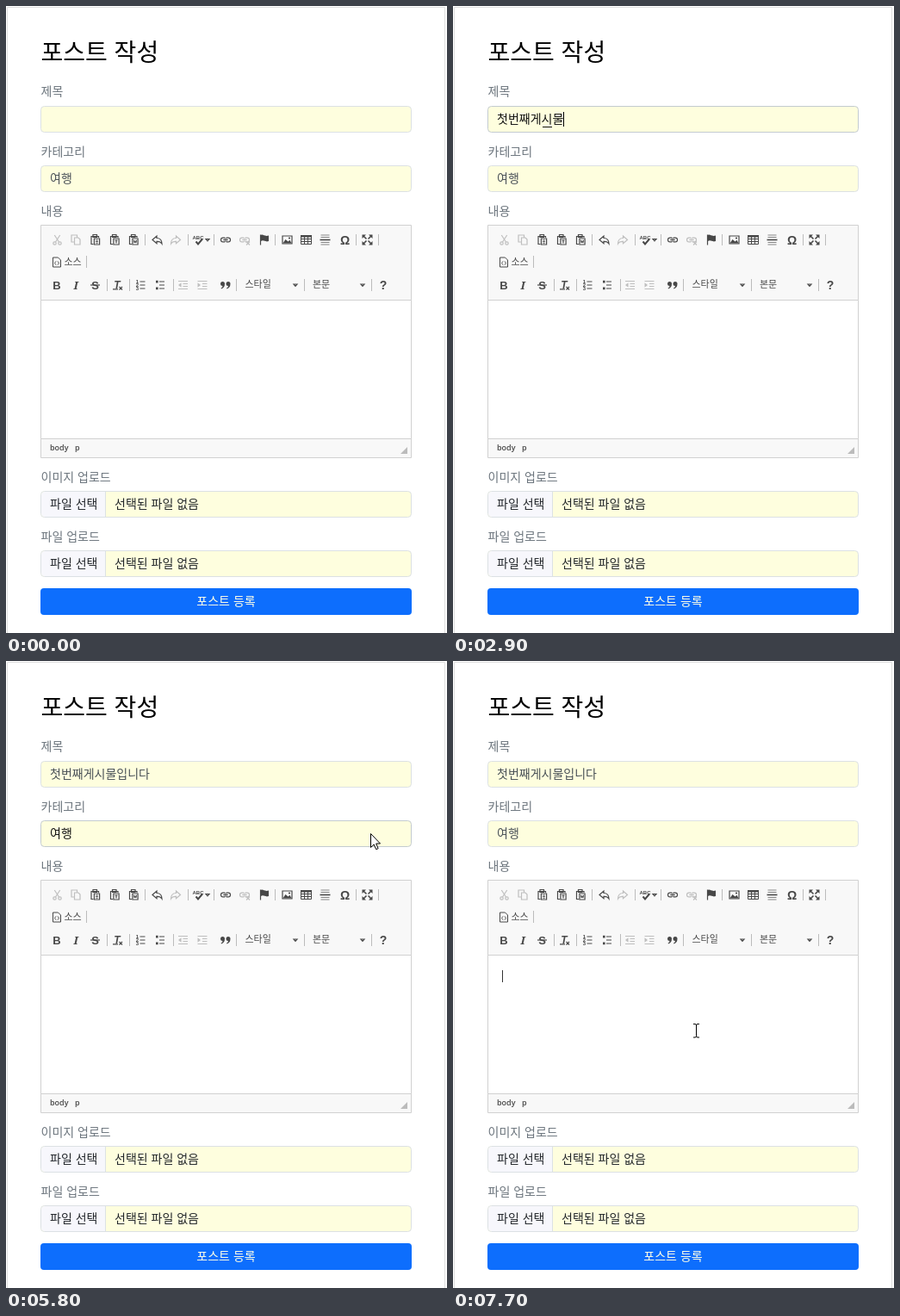
These frames come from a looping animation (512 by 728 pixels, 8000 ms). An HTML page:

```html
<!DOCTYPE html>
<html lang="ko">
<head>
<meta charset="utf-8">
<title>포스트 작성</title>
<style>
html, body { margin: 0; width: 100%; height: 100%; overflow: hidden; background: #fff; }
svg { display: block; }
text { font: 350 14px "Noto Sans CJK KR", "Noto Sans CJK", sans-serif; fill: #212529; white-space: pre; }
.title { font-size: 28px; fill: #000; }
.label text { fill: #6c757d; }
.box { fill: #fefede; stroke: #dce1e4; }
.value { fill: #495057; }
.light { fill: #ffffe6; }
.small text { font-size: 11px; fill: #484848; }
.path text { font: 600 9px "Open Sans", sans-serif; fill: #484848; }

.ico { fill: none; stroke: #484848; stroke-width: 1.2; }
.ico .f, .ico text { fill: #484848; stroke: none; }
.ico text { font: 700 14px "Liberation Sans", sans-serif; text-anchor: middle; }
.ico .tiny { font-size: 6px; }
.ico .serif { font: italic 700 13px "Noto Serif", serif; }
.off { opacity: .32; }

.anim, .anim * { animation: 8s step-end infinite; }
.title-box { animation-name: title-border; }
.title-value { animation-name: title-ink; }
.cat-box { animation-name: cat-border; }
.cat-value { animation-name: cat-ink; }
.menu { animation-name: menu; }
.arrow { animation-name: arrow; }
.beam { animation-name: beam; }
.body-caret { animation-name: body-caret; }
@keyframes title-border { 0%, 53.75% { stroke: #dce1e4; } 6.25% { stroke: #c3cbd0; } }
@keyframes title-ink { 0%, 53.75% { fill: #495057; } 6.25% { fill: #111; } }
@keyframes cat-border { 0%, 95% { stroke: #dce1e4; } 72.5% { stroke: #c3cbd0; } }
@keyframes cat-ink { 0%, 95% { fill: #495057; } 72.5% { fill: #111; } }
@keyframes menu { 0%, 87.5% { visibility: hidden; } 73.75% { visibility: visible; } }
@keyframes body-caret { 0% { visibility: hidden; } 95% { visibility: visible; } }
@keyframes arrow {
  0%, 92.5% { transform: translate(600px, 0); }
  70% { transform: translate(492px, 215px); }
  71.25% { transform: translate(446px, 205px); }
  72.5% { transform: translate(423px, 200px); }
  77.5% { transform: translate(411px, 208px); }
  78.75% { transform: translate(394px, 221px); }
  80% { transform: translate(379px, 231px); }
  81.25% { transform: translate(373px, 235px); }
  91.25% { transform: translate(364px, 262px); }
}
@keyframes beam {
  0% { transform: translate(600px, 0); }
  92.5% { transform: translate(330px, 352px); }
  93.75% { transform: translate(297px, 408px); }
  95% { transform: translate(284px, 427px); }
  96.25% { transform: translate(282px, 429px); }
}
</style>
</head>
<body>
<svg width="512" height="728" viewBox="0 0 512 728">
  <defs>
    <filter id="shadow" x="-5%" y="-50%" width="110%" height="200%">
      <feDropShadow dx="0" dy="2" stdDeviation="2.2" flood-color="#000" flood-opacity=".42"/>
    </filter>
    <g id="clip">
      <path d="M-2.5 5H-5V-4H3.5V-2.5"/>
      <path class="f" d="M-3-6H1.5V-3H-3Z"/>
      <path d="M-1.6-1.5H4.6V5.5H-1.6Z"/>
    </g>
    <path id="undo" class="f" d="M-5.5 0L-.5-4.5V-2C3.5-2 5.5 1 5.5 4.5C4 2 2 1.7-.5 1.8V4.3Z"/>
    <path id="link" d="M-.8-2.3H-3.2a2.3 2.3 0 0 0 0 4.6H-.8M.8-2.3H3.2a2.3 2.3 0 0 1 0 4.6H.8M-2.8 0H2.8M-.8-2.3V-1M.8-2.3V-1M-.8 2.3V1M.8 2.3V1"/>
    <path id="lines" d="M-1-4H5M-1 0H5M-1 4H5"/>
    <path id="dent" d="M-5.5-4.5H5.5M0-1.5H5.5M0 1.5H5.5M-5.5 4.5H5.5"/>
    <path id="drop" class="f" d="M-2-1H2L0 1.3Z"/>
    <g id="file">
      <rect class="box" x="40.5" y=".5" width="430" height="30" rx="4"/>
      <path d="M115 1H45a4 4 0 0 0-4 4V26a4 4 0 0 0 4 4H115Z" fill="#f7f7fc"/>
      <path d="M115.5 1V30" stroke="#dce1e4"/>
      <text x="51" y="20">파일 선택</text>
      <text x="126" y="20">선택된 파일 없음</text>
    </g>
  </defs>

  <path d="M1.5 730V1.5H509.5V730" fill="none" stroke="#dedede"/>
  <text class="title" x="40.5" y="64">포스트 작성</text>
  <g class="label">
    <text x="40.5" y="104">제목</text>
    <text x="40.5" y="174">카테고리</text>
    <text x="40.5" y="243">내용</text>
    <text x="40.5" y="552">이미지 업로드</text>
    <text x="40.5" y="621">파일 업로드</text>
  </g>

  <g class="anim">
    <rect class="box title-box" x="40.5" y="116.5" width="430" height="30" rx="4"/>
    <text class="value title-value" id="typed" x="51" y="136"></text>
    <rect class="box cat-box" x="40.5" y="185.5" width="430" height="30" rx="4"/>
    <text class="value cat-value" x="51" y="205">여행</text>
  </g>
  <path id="underline" d="M1 140.5H12" stroke="#111"/>
  <path id="caret" d="M.5 123V140" stroke="#000"/>

  <!-- editor -->
  <path d="M40.5 254.5H470.5V524.5H40.5Z" fill="#f8f8f8" stroke="#d1d1d1"/>
  <path d="M40.5 341.5H470.5V502.5H40.5Z" fill="#fff" stroke="#d1d1d1"/>
  <path d="M466 512V520H458Z" fill="#bbb"/>
  <g class="path"><text x="51" y="516">body</text><text x="80" y="516">p</text></g>
  <path fill="none" stroke="#bcbcbc" d="M161.5 265v13M211.5 265v13M241.5 265v13M312.5 265v13M406.5 265v13M432.5 265v13
    M93.5 290v14M117.5 317v14M143.5 317v14M194.5 317v14M267.5 317v14M346.5 317v14M424.5 317v14"/>
  <g class="small">
    <text x="67.5" y="301">소스</text>
    <text x="277.5" y="327">스타일</text>
    <text x="356" y="327">본문</text>
  </g>

  <g class="ico" transform="translate(0 271.5)">
    <g class="off" transform="translate(59.5)">
      <path d="M-3.2-5.5L2 2.5M3.2-5.5L-2 2.5"/><circle cx="-3" cy="4" r="1.7"/><circle cx="3" cy="4" r="1.7"/>
    </g>
    <g class="off" transform="translate(81)"><path d="M-2 2.5H-5V-5.5H1.5V-2.5M-1.5-2.5H3L5-.5V5.5H-1.5Z"/></g>
    <g transform="translate(104)"><use href="#clip"/><path d="M0 .5H3M0 2H3M0 3.7H3" stroke-width=".8"/></g>
    <g transform="translate(126.5)"><use href="#clip"/><path d="M0 .5H3M1.5 .5V4"/></g>
    <g transform="translate(148.5)"><use href="#clip"/><path d="M-.2 .3L.6 3.5 1.5 1 2.4 3.5 3.2 .3" stroke-width=".9"/></g>
    <use href="#undo" x="175.5"/>
    <use class="off" href="#undo" transform="translate(197) scale(-1 1)"/>
    <g transform="translate(223)"><text class="tiny" y="-1">ABC</text><path d="M-2.5 2L0 5L5-1" stroke-width="2"/></g>
    <use href="#drop" x="234"/>
    <use href="#link" x="255"/>
    <g class="off" transform="translate(277)"><use href="#link"/><path d="M2 2L6 6M6 2L2 6"/></g>
    <g transform="translate(300)">
      <path d="M-4.5-6V6"/><path class="f" d="M-4-5.5C-1.5-7 0-3.5 5-5V1.5C1 3-1-.5-4 1.5Z"/>
    </g>
    <g transform="translate(326.5)">
      <path d="M-5.5-4.5H5.5V4.5H-5.5Z"/><path class="f" d="M-5 4L-2-.5 1 2 3 .3 5 4Z"/><circle class="f" cx="2.5" cy="-2" r="1.1"/>
    </g>
    <g transform="translate(348.5)">
      <path d="M-6-5H6V5H-6ZM-6-1H6M-6 2H6M-2-4V5M2-4V5" stroke-width="1"/><path class="f" d="M-6.5-5.5H6.5V-3H-6.5Z"/>
    </g>
    <g transform="translate(370.5)">
      <path d="M-5-5.5H5M-5-3H5M-5 3H5M-5 5.5H5" stroke-width="1" opacity=".65"/><path d="M-6 0H6" stroke-width="1.6"/>
    </g>
    <text x="393.5" y="5">Ω</text>
    <g transform="translate(419.5)">
      <path d="M-4.5-4.5L-1-1M4.5-4.5L1-1M-4.5 4.5L-1 1M4.5 4.5L1 1" stroke-width="1.6"/>
      <path class="f" d="M-6-6H-1.5L-6-1.5ZM6-6H1.5L6-1.5ZM-6 6H-1.5L-6 1.5ZM6 6H1.5L6 1.5Z"/>
    </g>
  </g>
  <g class="ico" transform="translate(59 297.5)">
    <path d="M-4.5-5.5H1.5L4.5-2.5V5.5H-4.5ZM-1-1L-2.5 1 -1 3M1-1L2.5 1 1 3" stroke-width="1"/>
  </g>
  <g class="ico" transform="translate(0 324)">
    <text x="59" y="4.5" style="font-size:13px">B</text>
    <text class="serif" x="81" y="4.5">I</text>
    <text x="103.5" y="4.5" style="font-size:13px">S</text><path d="M98 0H109"/>
    <text x="129" y="4" style="font-size:12px;font-style:italic">T</text>
    <path d="M124 4.8H130M131.5 2L135 5.5M135 2L131.5 5.5"/>
    <g transform="translate(156.5)">
      <use href="#lines"/><text class="tiny" x="-4" y="-2">1</text><text class="tiny" x="-4" y="2.2">2</text><text class="tiny" x="-4" y="6.4">3</text>
    </g>
    <g transform="translate(179)">
      <use href="#lines"/><path class="f" d="M-5-5.2H-2.4V-2.6H-5ZM-5 2.6H-2.4V5.2H-5Z"/>
    </g>
    <g class="off" transform="translate(205.5)"><use href="#dent"/><path class="f" d="M-5.5 0L-2-2.7V2.7Z"/></g>
    <g class="off" transform="translate(228)"><use href="#dent"/><path class="f" d="M-2 0L-5.5-2.7V2.7Z"/></g>
    <path class="f" d="M249-1.5a2.5 2.5 0 1 1 5 0Q254 3 250 4.5L249.6 3.5Q251.5 2.5 251.5 1A2.5 2.5 0 0 1 249-1.5ZM255.5-1.5a2.5 2.5 0 1 1 5 0Q260.500 3 256.500 4.500L256.100 3.500Q258 2.500 258 1A2.500 2.500 0 0 1 255.500-1.500Z"/>
    <use href="#drop" x="336"/><use href="#drop" x="414"/>
    <text x="438" y="5">?</text>
  </g>

  <use href="#file" y="563"/>
  <use href="#file" y="632"/>
  <rect x="40" y="676" width="431" height="31" rx="4" fill="#0d6efd"/>
  <text class="light" x="255.500" y="696" text-anchor="middle">포스트 등록</text>

  <g class="anim">
    <path class="body-caret" d="M57.500 359V373" stroke="#333"/>
    <g class="menu">
      <path d="M40 220H471V259H40Z" fill="#fefede" filter="url(#shadow)"/>
      <path d="M41 221H470V240H41Z" fill="#767676"/>
      <path d="M40.500 220.500H470.500V259.500H40.500Z" fill="none" stroke="#a9abab" stroke-opacity=".6"/>
      <text class="light" x="51" y="235">여행</text>
      <text x="51" y="254" style="fill:#111">프로그래밍</text>
    </g>
    <path class="arrow" d="M.5 .5V16.500L4.200 13L6.700 18.700L9.100 17.700L6.700 12H11.500Z" fill="#fff" stroke="#000"/>
    <path class="beam" d="M-3-7.500H-1Q.5-7.500 .5-6Q.5-7.500 2-7.500H4M.5-6V6.500M-3 8H-1Q.5 8 .5 6.500Q.5 8 2 8H4" fill="none" stroke="#000"/>
  </g>
</svg>
<script>
const LOOP = 8000, FOCUS = 500, BLUR = 4300, FIRST_KEY = 1340, KEY_GAP = 110, ADVANCE = 12.88;
const word = '첫번째게시물입니다';
// what the syllable being composed looks like after each key
const keys = ['ㅊ처첫', 'ㅂ버번', 'ㅉ째짹', '게겟', '시심', '무물', 'ㅇ이입', 'ㄴ니닏', '다']
  .flatMap((forms, i) => [...forms].map(form => ({ index: i, text: word.slice(0, i) + form })));
const [typed, caret, underline] = ['typed', 'caret', 'underline'].map(id => document.getElementById(id));
const show = (el, on) => el.setAttribute('visibility', on ? 'visible' : 'hidden');
const moveTo = (el, count) => el.setAttribute('transform', `translate(${Math.round(51 + count * ADVANCE)} 0)`);

function draw(t) {
  const pressed = Math.max(0, Math.min(keys.length, Math.floor((t - FIRST_KEY) / KEY_GAP) + 1));
  const text = pressed ? keys[pressed - 1].text : '';
  if (typed.textContent !== text) typed.textContent = text;
  moveTo(caret, text.length);
  show(caret, t >= FOCUS && t < BLUR);
  // the composition mark trails the typing by two keys
  const marked = keys[pressed - 3];
  if (marked) moveTo(underline, marked.index);
  show(underline, marked && pressed < keys.length);
}

let start;
function tick(now) {
  start ??= now;
  draw((now - start) % LOOP);
  requestAnimationFrame(tick);
}
draw(0);
requestAnimationFrame(tick);
</script>
</body>
</html>
```
